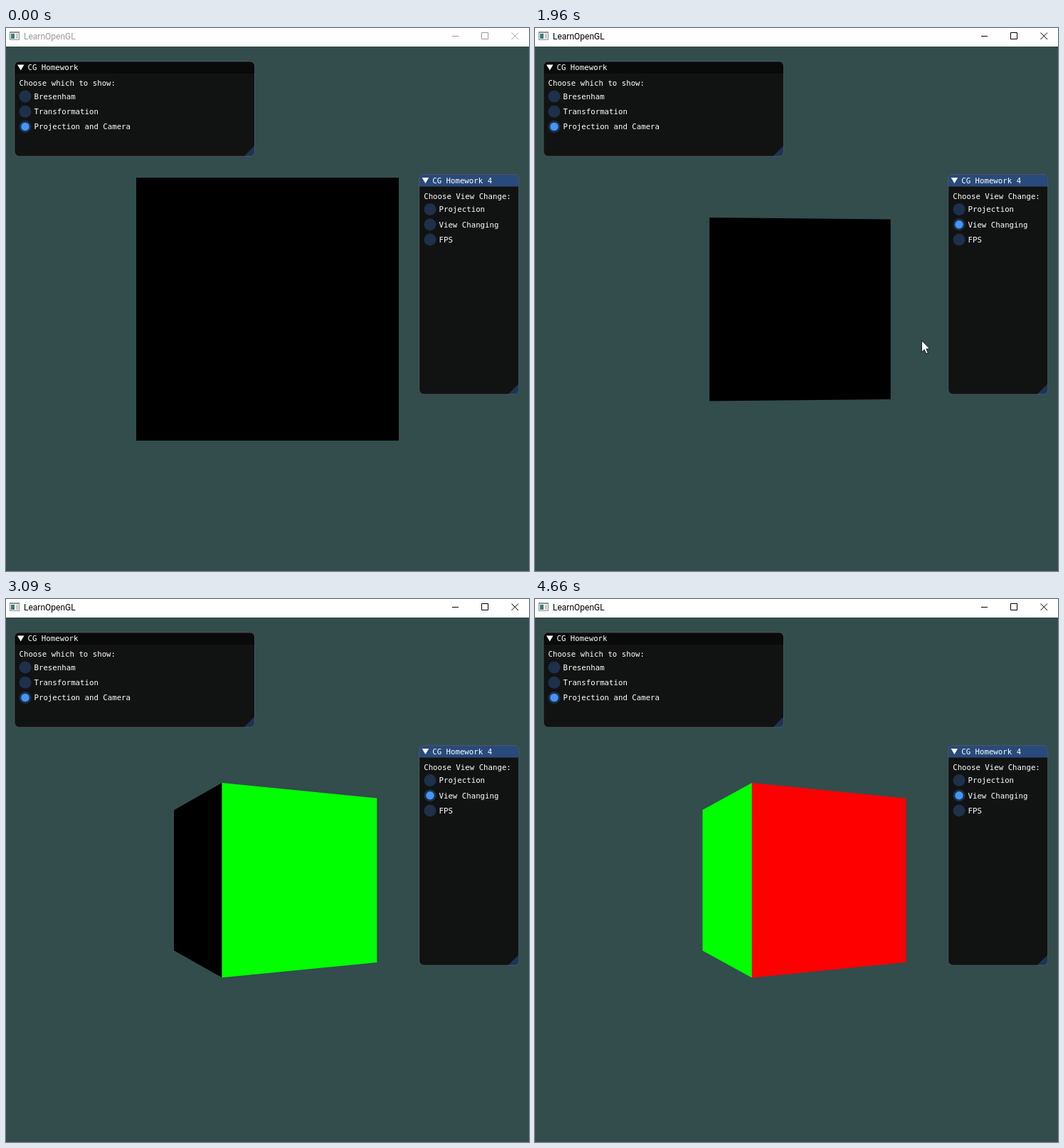
Write an HTML page with a canvas that moves like this. It is 735 by 762 pixels and loops after 4740 ms.

```html
<!DOCTYPE html>
<html lang="en">
<head>
<meta charset="utf-8">
<title>LearnOpenGL</title>
<style>
html, body { margin: 0; width: 100%; height: 100%; overflow: hidden; background: #334c4c; }
canvas { display: block; }
</style>
</head>
<body>
<canvas id="stage" width="735" height="762"></canvas>
<script>
const ctx = document.getElementById('stage').getContext('2d');
const LOOP = 4740, TAU = Math.PI * 2;
const MONO = '10.72px "DejaVu Sans Mono", monospace';

const BURSTS = [70, 630, 1180, 1710, 2240, 2790, 3320, 3870, 4410];
const CLICK = 12, RELEASE = 14, LAST = 60;

// Pointer path: step, x, y
const PATH = [
  [1, 662, 745], [7, 621, 288], [11, 603, 273], [15, 603, 273], [18, 594, 285],
  [20, 590, 292], [21, 571, 325], [24, 545, 430], [28, 539, 465], [32, 539, 465],
  [35, 577, 711], [38, 632, 775]
];

function stepAt(ms) {
  const burst = BURSTS.filter(start => start <= ms).length - 1;
  if (burst < 0) return 0;
  const inner = Math.min(6, Math.floor((ms - BURSTS[burst] + 5) / 75));
  return Math.min(LAST, 1 + burst * 7 + inner);
}

function pointerAt(step) {
  const i = PATH.findIndex(p => p[0] >= step);
  if (step < 1 || i < 0) return null;
  const b = PATH[i], a = PATH[Math.max(0, i - 1)];
  const u = (step - a[0]) / (b[0] - a[0] || 1);
  return { x: a[1] + (b[1] - a[1]) * u, y: a[2] + (b[2] - a[2]) * u };
}

function rect(x, y, w, h, color) {
  ctx.fillStyle = color;
  ctx.fillRect(x, y, w, h);
}

function polygon(points, color) {
  ctx.beginPath();
  points.forEach(p => ctx.lineTo(p[0], p[1]));
  ctx.closePath();
  ctx.fillStyle = color;
  ctx.fill();
}

function disc(x, y, r, color) {
  ctx.beginPath();
  ctx.arc(x, y, r, 0, TAU);
  ctx.fillStyle = color;
  ctx.fill();
}

function text(str, x, y, color = '#fff', font = MONO) {
  ctx.font = font;
  ctx.fillStyle = color;
  ctx.fillText(str, x, y);
}

function titleBar(active) {
  const ink = active ? '#000' : '#999';
  rect(0, 0, 735, 26, '#fff');
  rect(5, 5, 14, 12, '#8b9498');
  rect(6, 7, 12, 9, '#f2f4f4');
  rect(7, 8, 5, 7, '#3f7d78');
  rect(14, 8, 3, 7, '#c5cccc');
  text('LearnOpenGL', 25, 16, ink, '12px Roboto, sans-serif');
  ctx.strokeStyle = ink;
  ctx.lineWidth = 1;
  ctx.beginPath();
  ctx.moveTo(627, 11.5); ctx.lineTo(636, 11.5);
  ctx.rect(668.5, 6.5, 9, 9);
  ctx.moveTo(710.5, 6.5); ctx.lineTo(720, 16);
  ctx.moveTo(720, 6.5); ctx.lineTo(710.5, 16);
  ctx.stroke();
}

// A cube turning about its vertical axis, seen through a 60 degree lens.
function cube(step) {
  const focal = 368 / Math.tan(Math.PI / 6), distance = 6;
  const turn = (-19.8 - 4.4775 * (step - 20)) * Math.PI / 180;
  const corner = i => {
    const a = turn + i * Math.PI / 2;
    const half = focal / (distance - Math.SQRT2 * Math.cos(a));
    return { x: 367.5 + Math.SQRT2 * Math.sin(a) * half, half };
  };
  ['#00f', '#000', '#0f0', '#f00'].forEach((color, i) => {
    const l = corner(i - 1), r = corner(i), cy = 394.7;
    if (l.x < r.x) {
      polygon([[l.x, cy - l.half], [r.x, cy - r.half], [r.x, cy + r.half], [l.x, cy + l.half]], color);
    }
  });
}

function panel(x, y, w, h, title, color, heading) {
  ctx.save();
  ctx.beginPath();
  ctx.roundRect(x, y, w, h, 6.5);
  ctx.clip();
  rect(x, y, w, h, '#111312');
  rect(x, y, w, 17, color);
  polygon([[x + w, y + h], [x + w, y + h - 15], [x + w - 15, y + h]], '#1e3454');
  ctx.restore();
  ctx.beginPath();
  ctx.roundRect(x, y, w, h, 6.5);
  ctx.strokeStyle = 'rgba(110,110,128,.5)';
  ctx.lineWidth = 1;
  ctx.stroke();
  polygon([[x + 4, y + 4.5], [x + 13.5, y + 4.5], [x + 8.75, y + 12.5]], '#fff');
  text(title, x + 18.5, y + 12.3);
  text(heading, x + 6.5, y + 34.3);
}

function radio(label, x, y, checked, pointer, pressed) {
  const hover = pointer && Math.abs(pointer.y - y) < 8.5 &&
    pointer.x > x - 9 && pointer.x < x + 12 + label.length * 6.45;
  disc(x, y, 8.5, !hover ? '#1e304a' : pressed ? '#326aad' : '#254772');
  if (checked) disc(x, y, 5.7, '#4296fa');
  text(label, x + 12.5, y + 3.8);
}

function arrow({ x, y }) {
  const shape = [[0, 0], [0, 16], [3.7, 12.6], [6.3, 18.3], [8.8, 17.2], [6.3, 11.7], [11, 11.2]];
  polygon(shape.map(p => [x + p[0], y + p[1]]), '#fff');
  ctx.strokeStyle = '#000';
  ctx.lineWidth = 0.8;
  ctx.stroke();
}

function draw(ms) {
  const step = stepAt(ms), pointer = pointerAt(step);
  const pressed = step >= CLICK && step < RELEASE, viewing = step >= RELEASE;

  rect(0, 0, 735, 762, '#334c4c');
  titleBar(step >= CLICK);
  if (viewing) cube(step);
  else rect(183, 210, 369, 369, '#000');

  panel(12, 47, 337.5, 133, 'CG Homework', '#0a0a0a', 'Choose which to show:');
  ['Bresenham', 'Transformation', 'Projection and Camera'].forEach((label, i) =>
    radio(label, 27, 96 + i * 21.2, i === 2));

  panel(580.7, 205.5, 140, 308.5, 'CG Homework 4', '#294a7a', 'Choose View Change:');
  ['Projection', 'View Changing', 'FPS'].forEach((label, i) =>
    radio(label, 596, 254.5 + i * 21.2, viewing && i === 1, pointer, pressed));

  if (pressed) disc(603, 274, 11, 'rgba(230,230,0,.6)');
  if (pointer) arrow(pointer);
}

function tick() {
  draw(performance.now() % LOOP);
  requestAnimationFrame(tick);
}
tick();
</script>
</body>
</html>
```
